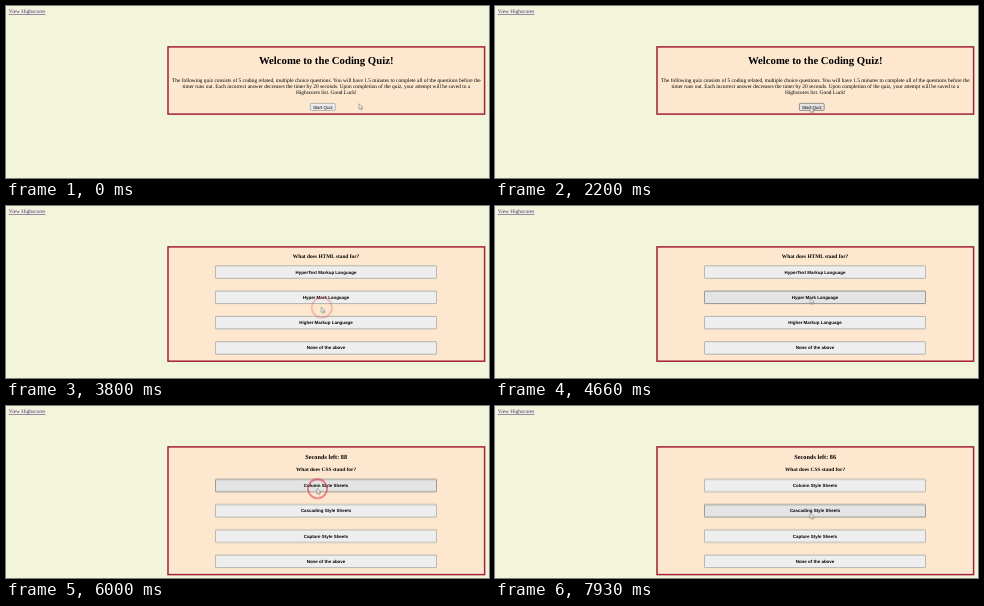
An HTML page that plays this animation: 483x172 px, repeating every 8000 ms.

```html
<!DOCTYPE html>
<html lang="en">
<head>
<meta charset="utf-8">
<title>Coding Quiz</title>
<style>
  html, body { margin: 0; width: 100%; height: 100%; overflow: hidden; background: #f3f5da; }
  svg { display: block; width: 100%; height: 100%; }

  text {
    font: 5.36px "Liberation Serif", "Times New Roman", serif;
    text-anchor: middle;
    text-rendering: geometricPrecision;
  }
  .link { text-anchor: start; fill: #4a2a78; text-decoration: underline; }
  .title { font-size: 10.72px; font-weight: bold; }
  .question { font-weight: bold; }
  .seconds { font-size: 6.27px; font-weight: bold; }
  .label { font: 4.467px "Liberation Sans", Arial, sans-serif; }
  .answer .label { font-weight: bold; }

  .panel { fill: #fde8cf; stroke: #a3213a; stroke-width: 1.5; }
  .button { fill: #eeeeee; stroke: #858b8b; stroke-width: .6; }

  /* One 8 s loop: 1% = 80 ms */
  .panel, .welcome, .quiz, .body, .first, .second, .button, .cursor, .ring {
    animation: 8s step-end infinite;
  }
  .panel   { animation-name: grow; }
  .welcome { animation-name: leave; }
  .quiz    { animation-name: enter; }
  .body    { animation-name: drop; }
  .first   { animation-name: first; }
  .second  { animation-name: second; }
  .start   { animation-name: start; }
  .hover1  { animation-name: hover1; }
  .hover2  { animation-name: hover2; }
  .cursor  { animation-name: move; animation-timing-function: ease-in-out; }
  .ring    { animation-name: click; animation-timing-function: linear; }
  .seconds { opacity: 0; animation: tick 8s step-end infinite; animation-delay: var(--at); }

  @keyframes grow {
    0% { height: 67.2px; }
    46.6% { height: 114.3px; }
    59.1%, 100% { height: 127.7px; }
  }
  @keyframes leave { 0% { opacity: 1; } 46.6%, 100% { opacity: 0; } }
  @keyframes enter { 0% { opacity: 0; } 46.6%, 100% { opacity: 1; } }
  @keyframes drop {
    0% { transform: translateY(0); }
    59.1%, 100% { transform: translateY(13.45px); }
  }
  @keyframes first { 0% { opacity: 1; } 74.9%, 100% { opacity: 0; } }
  @keyframes second { 0% { opacity: 0; } 74.9%, 100% { opacity: 1; } }
  @keyframes tick { 0% { opacity: 1; } 12.5%, 100% { opacity: 0; } }

  @keyframes start {
    0% { fill: #eeeeee; stroke: #858b8b; }
    6.1% { fill: #e3e3e3; stroke: #555b5b; }
    45%, 100% { fill: #f4f2ee; stroke: #b5b5b0; }
  }
  @keyframes hover1 {
    0% { fill: #eeeeee; stroke: #858b8b; }
    64.4% { fill: #e4e4e4; stroke: #555b5b; }
    89.4%, 100% { fill: #eeeeee; stroke: #858b8b; }
  }
  @keyframes hover2 {
    0% { fill: #eeeeee; stroke: #858b8b; }
    55% { fill: #e4e4e4; stroke: #555b5b; }
    60% { fill: #eeeeee; stroke: #858b8b; }
    92.8%, 100% { fill: #e4e4e4; stroke: #555b5b; }
  }

  @keyframes move {
    0%, .6% { transform: translate(353px, 97.7px); }
    10% { transform: translate(315.7px, 102px); }
    15.75%, 52.5% { transform: translate(315.3px, 101.2px); }
    58.25%, 59.2% { transform: translate(315.2px, 92.4px); }
    68.25%, 86.6% { transform: translate(311px, 82.4px); }
    96.6% { transform: translate(315px, 106.4px); }
    99%, 100% { transform: translate(315.3px, 107.2px); }
  }
  @keyframes click {
    0%, 44.9% { opacity: 0; r: 10.8px; }
    45%, 46.6% { opacity: .85; r: 10.8px; }
    48.2%, 74% { opacity: 0; r: 9.6px; }
    74.1%, 75.8% { opacity: .85; r: 9.6px; }
    78%, 100% { opacity: 0; r: 9.6px; }
  }
</style>
</head>
<body>
<svg viewBox="0 0 483 172" preserveAspectRatio="none">
  <text class="link" x="2.7" y="7.4">View Highscores</text>
  <rect class="panel" x="162" y="40.9" width="316.6" height="67.2"/>

  <g class="welcome">
    <text class="title" x="320.2" y="58.2">Welcome to the Coding Quiz!</text>
    <text x="320.3" y="75.6">The following quiz consists of 5 coding related, multiple choice questions. You will have 1.5 minutes to complete all of the questions before the</text>
    <text x="320.3" y="81.7">timer runs out. Each incorrect answer decreases the timer by 20 seconds. Upon completion of the quiz, your attempt will be saved to a</text>
    <text x="320.3" y="87.8">Highscores list. Good Luck!</text>
    <rect class="button start" x="304.4" y="97.4" width="24.8" height="7" rx=".8"/>
    <text class="label" x="316.8" y="102.5">Start Quiz</text>
  </g>

  <g class="quiz">
    <text class="seconds" x="320.2" y="52.9" style="--at: 4.73s">Seconds left: 89</text>
    <text class="seconds" x="320.2" y="52.9" style="--at: 5.73s">Seconds left: 88</text>
    <text class="seconds" x="320.2" y="52.9" style="--at: 6.73s">Seconds left: 87</text>
    <text class="seconds" x="320.2" y="52.9" style="--at: 7.73s">Seconds left: 86</text>
    <g class="body">
      <text class="question first" x="320" y="52">What does HTML stand for?</text>
      <text class="question second" x="320" y="52">What does CSS stand for?</text>
      <g class="answer">
        <rect class="button hover1" x="209.4" y="59.8" width="221.2" height="12.5" rx=".8"/>
        <text class="label first" x="320" y="67.6">HyperText Markup Language</text>
        <text class="label second" x="320" y="67.6">Column Style Sheets</text>
      </g>
      <g class="answer" transform="translate(0 25.3)">
        <rect class="button hover2" x="209.4" y="59.8" width="221.2" height="12.5" rx=".8"/>
        <text class="label first" x="320" y="67.6">Hyper Mark Language</text>
        <text class="label second" x="320" y="67.6">Cascading Style Sheets</text>
      </g>
      <g class="answer" transform="translate(0 50.6)">
        <rect class="button" x="209.4" y="59.8" width="221.2" height="12.5" rx=".8"/>
        <text class="label first" x="320" y="67.6">Higher Markup Language</text>
        <text class="label second" x="320" y="67.6">Capture Style Sheets</text>
      </g>
      <g class="answer" transform="translate(0 75.9)">
        <rect class="button" x="209.4" y="59.8" width="221.2" height="12.5" rx=".8"/>
        <text class="label" x="320" y="67.6">None of the above</text>
      </g>
    </g>
  </g>

  <g class="cursor">
    <circle class="ring" cx=".5" cy=".3" r="10.8" fill="none" stroke="#e0404f" stroke-width="1.4"/>
    <path d="M0 0V5.4L1.3 4.2L2.2 6.2L3.1 5.8L2.3 3.9H4Z" fill="#fff" stroke="#333" stroke-width=".4"/>
  </g>
</svg>
</body>
</html>
```
